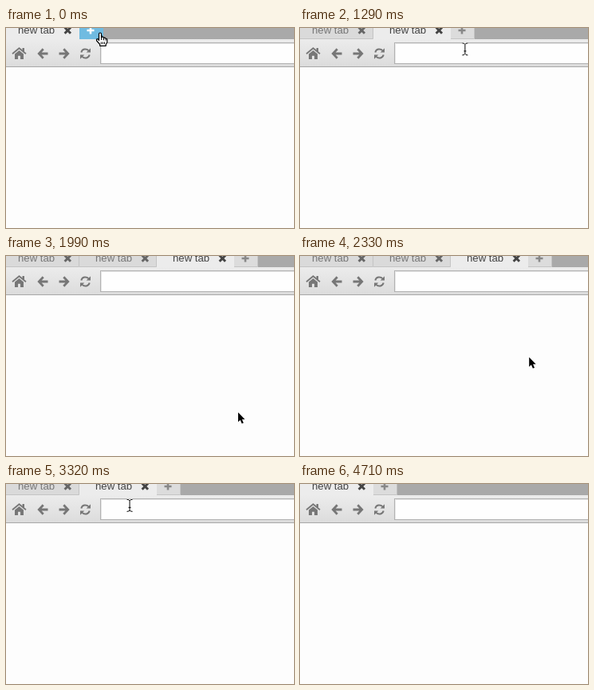
Recreate the animation shown at these times as an HTML page. Size 361 px wide and 250 px high, loop 5160 ms.

```html
<!DOCTYPE html>
<html lang="en">
<head>
<meta charset="utf-8">
<title>Browser tabs</title>
<style>
  html, body { margin: 0; width: 100%; height: 100%; overflow: hidden; background: #fdfdfd; }
  svg { display: block; }
  text { font: 13.2px "Liberation Sans", Arial, sans-serif; }
  .icon { fill: none; stroke: #777; stroke-width: 2.8; }
  .solid { fill: #777; }
  .edge { fill: none; stroke: #c4c4c4; }
  .tab .face { fill: #dadada; }
  .tab .hot { fill: none; }
  .tab text { fill: #777; }
  .tab .x { stroke: #666; stroke-width: 3; }
  .tab.active .face { fill: #ececec; }
  .tab.active .edge { stroke: none; }
  .tab.active text { fill: #444; }
  .tab.active .x { stroke: #444; }
  .tab.hover .hot { fill: #e67d7d; }
  .tab.hover .x { stroke: #fff; }
  #plus rect { fill: #dcdcdc; }
  #plus .sign { stroke: #888; stroke-width: 2.6; }
  #plus.hover rect { fill: #70bbe1; }
  #plus.hover .sign { stroke: #fff; }
  #plus.hover .edge { stroke: none; }
  .halo { fill: none; stroke: #fff; stroke-width: 2.4; }
  .line { fill: none; stroke: #000; }
</style>
</head>
<body>
<svg width="361" height="250" viewBox="0 0 361 250">
  <defs>
    <linearGradient id="bar" x2="0" y2="1">
      <stop stop-color="#ececec"/>
      <stop offset="1" stop-color="#dcdcdc"/>
    </linearGradient>
    <path id="beam" d="M-3.5-7.5Q-.5-7.5 0-6Q.5-7.5 3.5-7.5M0-6V6M-3.5 7.5Q-.5 7.5 0 6Q.5 7.5 3.5 7.5M-1.5 2.5H1.5"/>
  </defs>

  <rect width="361" height="250" fill="#fdfdfd"/>
  <rect width="361" height="14" fill="#a9a9a9"/>
  <rect y="14" width="361" height="34" fill="url(#bar)"/>
  <rect y="48" width="361" height="1" fill="#a8a8a8"/>

  <g id="tabs"></g>
  <g id="plus">
    <rect width="30" height="14"/>
    <path class="edge" d="M0 13.5H29.5V0"/>
    <path class="sign" d="M9.5 3H18.5M14-1.5V7.5"/>
  </g>

  <path class="icon" style="stroke-width:1.8" d="M8 32.2L16.5 25.2L25 32.2"/>
  <path class="solid" d="M20.5 25H23V30L20.5 28ZM11 32.5L16.5 28L22 32.5V39H18V34.8H15V39H11Z"/>
  <path class="icon" d="M46.7 26.3L41.3 32L46.7 37.7M42 32H52.5"/>
  <path class="icon" d="M72.3 26.3L77.7 32L72.3 37.7M77 32H66.5"/>
  <path class="icon" style="stroke-width:2" d="M94.3 30.4A5.3 5.3 0 0 1 103.4 28.2M104.7 33.6A5.3 5.3 0 0 1 95.6 35.8"/>
  <path class="solid" d="M106 25.3V30.6H100.7ZM93 38.7V33.4H98.3Z"/>

  <rect x="118.5" y="18.5" width="250" height="26" fill="#fefefe" stroke="#b2b2b2"/>
  <path d="M119.5 44V19.5H361" fill="none" stroke="#e6e6e6"/>

  <g id="cursor">
    <g id="hand">
      <path fill="#fff" stroke="#000" stroke-width="1.2" stroke-linejoin="round"
        d="M-1.5 8.5V.5Q-1.5-1 0-1T1.5.5V5Q2-.2 2 4.4Q4.4 3.6 4.6 5.4Q6.6 4.6 7 6.3Q9 6 8.8 8V11L7.2 13.5V15.3H-.3V13.5L-4.3 9Q-5 7 -3.6 6.7Q-2.5 6.6-1.5 8.5Z"/>
      <path class="line" d="M1.6 4.5V8M4.5 5.5V8.3M7 6.5V8.6M1.3 10.5V13M3.4 10.5V13M5.5 10.5V13"/>
    </g>
    <g id="ibeam"><use href="#beam" class="halo"/><use href="#beam" class="line"/></g>
    <path id="arrow" stroke="#fff" stroke-width="1.4" paint-order="stroke"
      d="M0 0V12L2.7 9.4L4.7 14L6.8 13.1L4.9 8.7H8.5Z"/>
  </g>
</svg>
<script>
const LOOP = 5160;
const STEP = 55.5;
const TAB = 97;
const $ = id => document.getElementById(id);

// Pointer trips: start, end, Bezier points
const trips = [
  [844, 1420, [118, 7], [128, 82], [226, 60], [204, 7]],
  [1712, 2050, [204, 7], [299, 213]],
  [2050, 2670, [299, 213], [271, 8]],
  [2985, 3490, [271, 8], [255, 75], [104, 28], [165, 7]],
  [4135, 4350, [165, 7], [266, 214]],
  [4535, 4700, [266, 214], [266, 275]]
];
const opened = [720, 1710];
const closed = [2910, 3950];

const smooth = p => p * p * (3 - 2 * p);
const mix = (a, b, u) => a + (b - a) * u;
const show = (el, on) => { el.style.display = on ? "" : "none"; };
const past = (times, t) => times.filter(time => time <= t).length;
const right = i => 92 + TAB * i;

function bezier(points, u) {
  while (points.length > 1) {
    points = points.slice(1).map(([x, y], i) => [mix(points[i][0], x, u), mix(points[i][1], y, u)]);
  }
  return points[0];
}

// The pointer moves in steps and rests between trips.
function pointer(t) {
  const [start, end, ...points] = trips.findLast(trip => trip[0] <= t) || trips[0];
  const stepped = Math.max(0, Math.floor((t - start) / STEP) * STEP);
  return bezier(points, smooth(Math.min(1, stepped / (end - start))));
}

function shape(x, y) {
  if (y < 18) return "hand";
  return y < 46 && x > 118 ? "ibeam" : "arrow";
}

function tabMarkup(i) {
  const end = right(i);
  const left = i ? end - TAB : 0;
  const shift = TAB * i;
  return `<g class="tab">
    <rect class="face" x="${left}" width="${end - left}" height="14"/>
    <rect class="hot" x="${end - 28}" width="26" height="14"/>
    <path class="edge" d="M${left} 13.5H${end - 0.5}V0"/>
    <text x="${15 + shift}" y="7">new tab</text>
    <path class="x" d="M${73.6 + shift}-.7l7.4 7.4m0-7.4l-7.4 7.4"/>
  </g>`;
}

$("tabs").innerHTML = [0, 1, 2].map(tabMarkup).join("");
const tabs = [...$("tabs").children];

function draw(t) {
  const last = past(opened, t) - past(closed, t);
  const edge = right(last);
  const [x, y] = pointer(t);
  const over = (from, to) => y < 14 && x >= from && x < to;

  tabs.forEach((tab, i) => {
    show(tab, i <= last);
    tab.classList.toggle("active", i === last);
    tab.classList.toggle("hover", i === last && over(edge - 28, edge - 2));
  });
  $("plus").setAttribute("transform", `translate(${edge})`);
  $("plus").classList.toggle("hover", over(edge, edge + 30));

  for (const id of ["hand", "ibeam", "arrow"]) show($(id), id === shape(x, y));
  $("cursor").setAttribute("transform", `translate(${x} ${y})`);
}

const start = performance.now();
function tick() {
  draw((performance.now() - start) % LOOP);
  requestAnimationFrame(tick);
}
tick();
</script>
</body>
</html>
```
